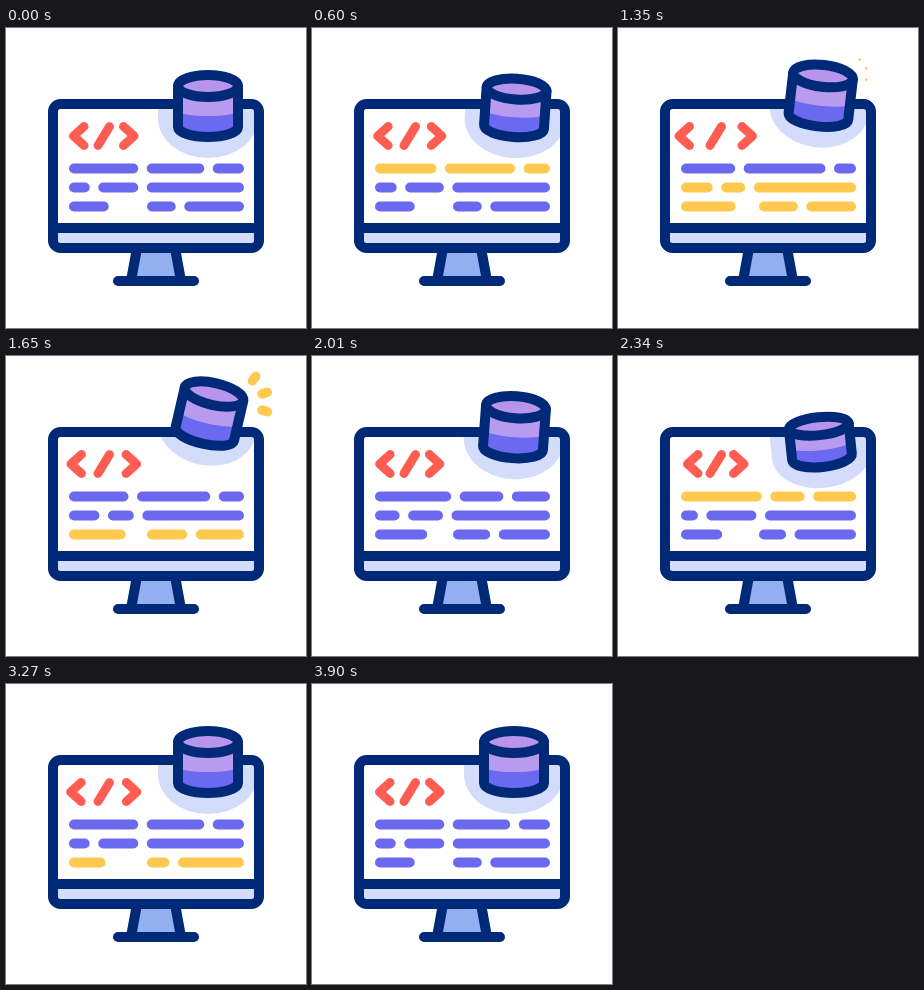
Recreate the animation shown at these times as an HTML page. Size 300 by 300 pixels, loop 4.5 s.

```html
<!DOCTYPE html>
<html lang="en">
<head>
<meta charset="utf-8">
<title>Code and database</title>
<style>
html, body { margin: 0; width: 100%; height: 100%; overflow: hidden; background: #fff; }
svg { display: block; width: 100vw; height: 100vh; }
path, .line { stroke-linecap: round; stroke-linejoin: round; }
.line { fill: none; stroke: #002a78; stroke-width: 10; }
.code { fill: none; stroke: #ff5d52; stroke-width: 9; }
.row { fill: none; stroke: #6c69f1; stroke-width: 10; }
.row.lit, .spark { stroke: #ffc94f; }
</style>
</head>
<body>
<svg viewBox="0 0 300 300">
  <clipPath id="screen"><rect x="50" y="79" width="198" height="118"/></clipPath>
  <path fill="#92b0f0" d="M131 220H169L175 253H125Z"/>
  <path class="line" d="M131 220L125 253M169 220L175 253M112 253H188"/>
  <rect x="47" y="76" width="206" height="144" rx="7.5" fill="#fff"/>
  <path fill="#d3ddfb" d="M47 200H253V220H47Z"/>
  <g clip-path="url(#screen)"><path id="halo" fill="#d3ddfb"/></g>
  <path class="line" d="M47 200H253"/>
  <rect class="line" x="47" y="76" width="206" height="144" rx="7.5"/>
  <path class="code" id="left" d="M78 98.5L67.5 108L78 117.5"/>
  <path class="code" d="M103.5 98.5L92 117.5"/>
  <path class="code" id="right" d="M117.5 98.5L128 108L117.5 117.5"/>
  <g id="rows"></g>
  <g id="sparks"></g>
  <g id="drum">
    <path id="side" fill="#b89bef"/>
    <path id="base" fill="#6c69f1"/>
    <path id="edge" class="line"/>
    <ellipse id="lid" class="line" rx="30" style="fill:#b994ec"/>
  </g>
</svg>
<script>
const LOOP = 4500;
const $ = id => document.getElementById(id);
const set = (id, name, value) => $(id).setAttribute(name, value);

const part = (t, a, b) => Math.min(1, Math.max(0, (t - a) / (b - a)));
const ease = (t, a, b) => { const u = part(t, a, b); return u * u * (3 - 2 * u); };
const hump = (t, a, b) => Math.sin(Math.PI * part(t, a, b));
const pulse = (t, a, b) => hump(t, a, b) ** 2;
// Rises from a to b, holds, falls from c to d.
const swell = (t, a, b, c, d) => ease(t, a, b) - ease(t, c, d);

// Two gaps per row: resting place, first swing, second swing.
const rows = [
  { gaps: [[136.5, -16, 11.7], [202.5, 9.8, -11.7]] },
  { gaps: [[88, 11, -5], [136.5, -5, 8]] },
  { gaps: [[107, 17, -6], [174, 11.5, -12]], mid: 141 }
];

function addPaths(id, count, cls) {
  return Array.from({ length: count }, () => {
    const path = document.createElementNS("http://www.w3.org/2000/svg", "path");
    path.setAttribute("class", cls);
    return $(id).appendChild(path);
  });
}
const rowPaths = addPaths("rows", rows.length, "row");
const sparkPaths = addPaths("sparks", 3, "spark");

function drawRow(path, i, t) {
  const { gaps, mid } = rows[i];
  const y = 140.5 + 19 * i, half = 4.25, cap = 5;
  const late = t - 225 * i, glow = t - 325 * i;
  const [p, q] = gaps.map(([rest, first, second]) =>
    rest + first * hump(late, 330, 2000) + second * hump(late, 1750, 3050));
  const bar = (from, to) => `M${from + cap} ${y}H${to - cap}`;
  path.setAttribute("d", bar(63, p - half) + bar(mid || p + half, q - half) + bar(q + half, 238));
  const lit = (glow >= 390 && glow < 1310) || (glow >= 2130 && glow < 2910);
  path.classList.toggle("lit", lit);
}

function drawSpark(path, i, t) {
  const angle = (36 * i - 54) * Math.PI / 180;
  const at = r => `${231 + r * Math.cos(angle)} ${46 + r * Math.sin(angle)}`;
  const tail = 18 + 18 * ease(t, 1410, 1920), head = 18 + 18 * ease(t, 1320, 1800);
  path.setAttribute("d", `M${at(tail)}L${at(head)}`);
  path.setAttribute("stroke-width", 9.5 * swell(t, 1320, 1410, 1860, 1980));
}

function drawDrum(t) {
  const lift = swell(t, 1110, 1590, 1770, 2160);
  const lean = swell(t, 2040, 2340, 2760, 3240);
  const squash = 8.5 * swell(t, 330, 1000, 1080, 1380) + 10 * swell(t, 2100, 2340, 2450, 3200);
  const turn = 4 * hump(t, 330, 960) + 13 * lift - 6 * lean;
  const move = `translate(${202 - 3.2 * lift + 2 * lean} ${99 - 21 * lift + 2 * lean}) rotate(${turn})`;
  set("drum", "transform", move);
  set("halo", "transform", move);

  const h = 41 - squash, band = -0.4 * h, shoulder = h / 2 - 12;
  const body = `M-30 ${-h}V0A30 10 0 0 0 30 0V${-h}`;
  set("side", "d", body);
  set("edge", "d", body);
  set("base", "d", `M-30 ${band}V0A30 10 0 0 0 30 0V${band}A30 5.5 0 0 1 -30 ${band}`);
  set("lid", "cy", -h);
  set("lid", "ry", 2.8 + 0.2 * h);
  set("halo", "d", `M-50 -70V${-shoulder}A50 ${31 + shoulder} 0 0 0 50 ${-shoulder}V-70Z`);
}

function drawBrackets(t) {
  const gap = 7.5 * pulse(t, 330, 1980) - 2 * pulse(t, 1950, 2700) + 3.2 * pulse(t, 2300, 3900);
  set("left", "transform", `translate(${-gap})`);
  set("right", "transform", `translate(${gap})`);
}

const start = performance.now();
function tick() {
  const t = (performance.now() - start) % LOOP;
  drawBrackets(t);
  rowPaths.forEach((path, i) => drawRow(path, i, t));
  sparkPaths.forEach((path, i) => drawSpark(path, i, t));
  drawDrum(t);
  requestAnimationFrame(tick);
}
tick();
</script>
</body>
</html>
```
